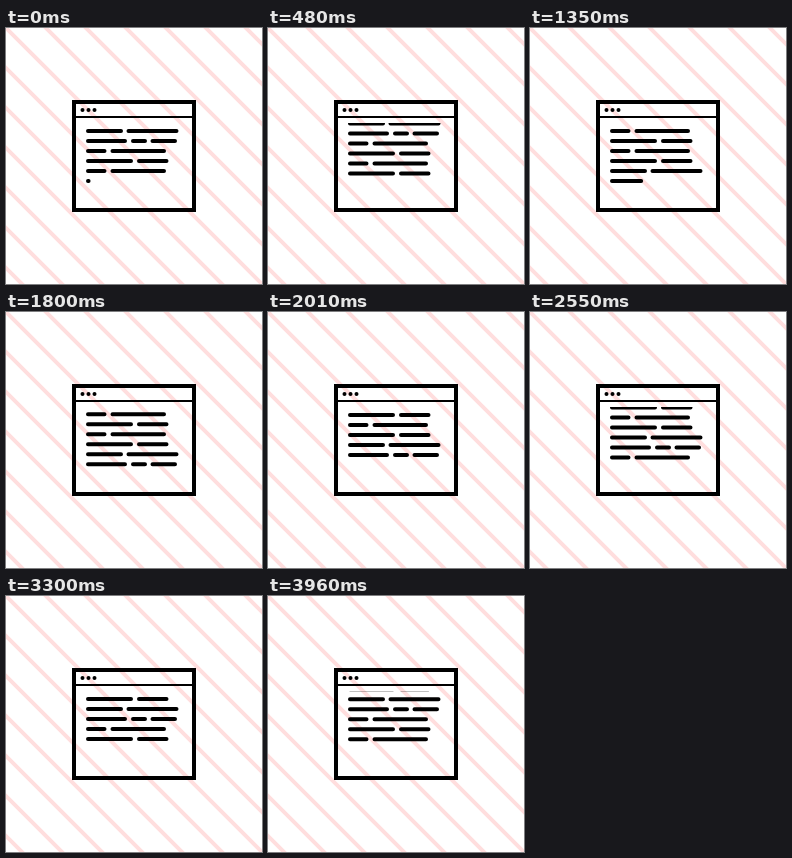
Recreate the animation shown at these times as an HTML page. Size 256 by 256 pixels, loop 3990 ms.

```html
<!DOCTYPE html>
<html lang="en">
<head>
<meta charset="utf-8">
<title>Scrolling code window</title>
<style>
  html, body { margin: 0; width: 100%; height: 100%; overflow: hidden; background: #fff; }
  svg { display: block; width: 100vw; height: 100vh; }
</style>
</head>
<body>
<svg id="stage" viewBox="0 0 256 256">
  <defs>
    <clipPath id="page"><rect x="70" y="95" width="116" height="85"/></clipPath>
  </defs>
  <rect width="256" height="256" fill="#fff"/>
  <path id="stripes" stroke="#ffdede" stroke-width="4" fill="none"/>
  <g fill="none" stroke="#000">
    <rect x="68" y="74" width="120" height="108" stroke-width="4"/>
    <path d="M68 89H188" stroke-width="2"/>
  </g>
  <g>
    <circle cx="76.5" cy="82" r="2"/>
    <circle cx="82.5" cy="82" r="2"/>
    <circle cx="88.5" cy="82" r="2"/>
  </g>
  <g clip-path="url(#page)">
    <path id="text" fill="none" stroke="#000" stroke-width="4" stroke-linecap="round"/>
  </g>
</svg>
<script>
const LOOP = 3990;
const TYPE_MS = 150;
const SCROLL_MS = 300;
const VISIBLE = 5;
const ROW_GAP = 10;
const FIRST_ROW = 103;

// Each line of code is a list of dashes: [start, end] of the stroke centre.
const LINES = {
  A: [[82, 115], [122.5, 170.5]],
  B: [[82, 119], [127, 139], [146.5, 169]],
  C: [[82, 98.5], [106.5, 158]],
  D: [[82, 125], [133, 160.5]]
};
const ORDER = [...'ABCDCDABCDC'].map(key => LINES[key]);
const STARTS = [0, 630, 1270, 2070, 2730, 3405];

const clamp = v => Math.min(1, Math.max(0, v));
const easeOut = p => 1 - (1 - p) ** 2;
const easeInOut = p => p < 0.5 ? 4 * p ** 3 : 1 - 4 * (1 - p) ** 3;

const text = document.getElementById('text');

function drawStripes() {
  let d = '';
  for (let x = -280; x <= 280; x += 40) d += `M${x - 10} -10l276 276`;
  document.getElementById('stripes').setAttribute('d', d);
}

// elapsed is the typing time spent on this line
function linePath(dashes, y, elapsed) {
  return dashes.map(([x1, x2], i) => {
    const p = clamp((elapsed - i * TYPE_MS) / TYPE_MS);
    return p > 0 ? `M${x1} ${y}H${x1 + (x2 - x1) * easeOut(p)}` : '';
  }).join('');
}

function render(time) {
  const t = time % LOOP;
  const step = STARTS.findLastIndex(start => start <= t);
  const elapsed = t - STARTS[step];
  const typingEnd = ORDER[step + VISIBLE].length * TYPE_MS;
  const shift = ROW_GAP * easeInOut(clamp((elapsed - typingEnd) / SCROLL_MS));
  let d = '';
  for (let row = 0; row <= VISIBLE; row++) {
    const y = FIRST_ROW + row * ROW_GAP - shift;
    d += linePath(ORDER[step + row], y, row < VISIBLE ? Infinity : elapsed);
  }
  text.setAttribute('d', d);
}

drawStripes();
render(0);
const begin = performance.now();
(function frame() {
  render(performance.now() - begin);
  requestAnimationFrame(frame);
})();
</script>
</body>
</html>
```
